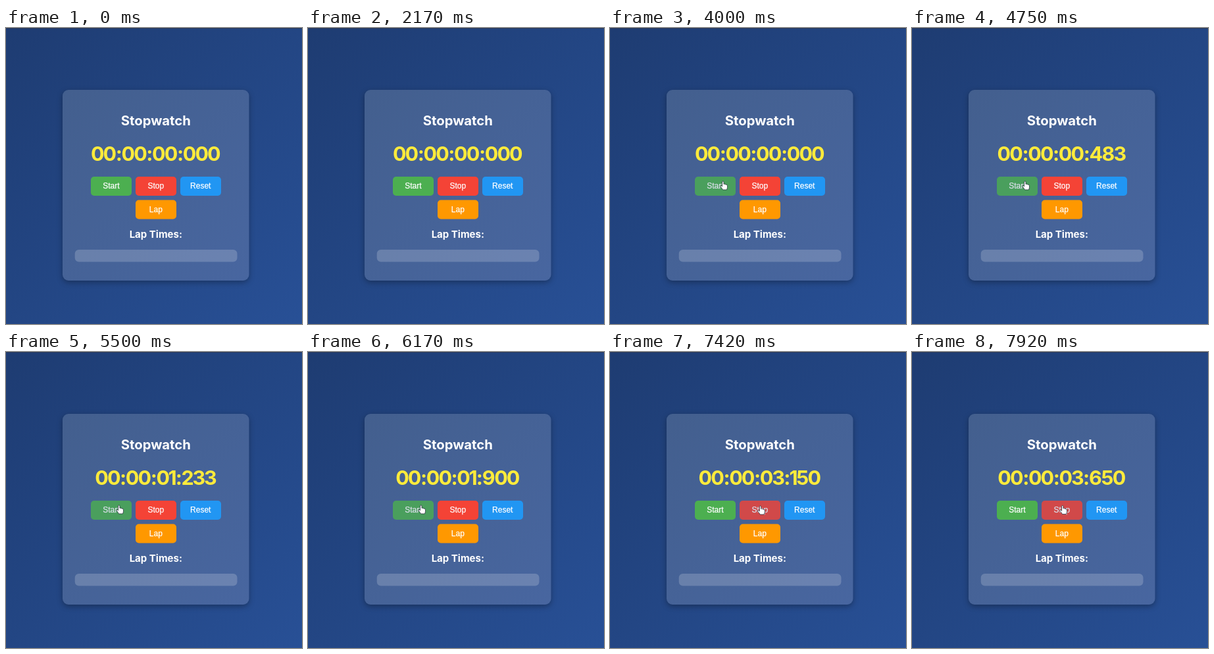
An HTML page that plays this animation: 450x450 px, repeating every 8000 ms.

```html
<!DOCTYPE html>
<html lang="en">
<head>
<meta charset="utf-8">
<title>Stopwatch</title>
<style>
  html, body { margin: 0; width: 100%; height: 100%; overflow: hidden; background: #24477f; }
  svg { display: block; width: 100vw; height: 100vh; }
  text { text-anchor: middle; fill: #fff; }
  .head { font-family: Inter, "Open Sans", sans-serif; font-weight: 700; font-feature-settings: "calt" 0; }
  #time { fill: #ffeb3b; font-weight: 650; }
  .btn text { font: 12px "Liberation Sans", Arial, sans-serif; stroke: #fff; stroke-width: .25; }
  .card { filter: drop-shadow(0 3px 4px rgba(0, 0, 0, .3)); }
  #cursor path { fill: #fff; stroke: #222a38; stroke-width: .7; stroke-linejoin: round; }
</style>
</head>
<body>
<svg viewBox="0 0 450 450">
  <defs>
    <linearGradient id="sky" x1="0" y1="0" x2="1" y2="1">
      <stop offset="0" stop-color="#1e3c72"/>
      <stop offset="1" stop-color="#285096"/>
    </linearGradient>
    <linearGradient id="glass" gradientUnits="userSpaceOnUse" x1="86" y1="94" x2="369" y2="384">
      <stop offset="0" stop-color="#435f8e"/>
      <stop offset="1" stop-color="#4866a0"/>
    </linearGradient>
  </defs>
  <rect width="450" height="450" fill="url(#sky)"/>
  <rect width="450" height="1" fill="#2b3856"/>
  <rect class="card" x="86" y="94" width="283.5" height="290" rx="9" fill="url(#glass)"/>
  <text class="head" x="227.8" y="148" font-size="20.3">Stopwatch</text>
  <text class="head" id="time" y="202.4" font-size="30.5"></text>
  <g id="buttons"></g>
  <text class="head" x="227.8" y="319" font-size="15">Lap Times:</text>
  <rect x="104.7" y="337" width="246.8" height="18.6" rx="6" fill="#fff" fill-opacity=".19"/>
  <g id="cursor">
    <path id="arrow" d="M0 0V9.5L2.2 7.4L3.7 10.8L5.2 10.1L3.8 6.9H6.8Z"/>
    <path id="hand" transform="scale(1.08)" d="M-1.3 7V1Q-1.3 0 -.2 0T.9 1V4Q2.2 3.4 2.8 4.4Q4.1 4 4.6 5Q6 4.7 6 6.2V8.5Q6 10 5 12H-.5Q-1.5 10 -3.8 7.4Q-4.2 6.3 -3.2 6.2Q-2.3 6.2 -1.3 7.4Z"/>
  </g>
</svg>
<script>
const LOOP = 8000, FPS = 12, FADE = 300, CENTER = 227.8, STARTED = 4267;
const $ = id => document.getElementById(id);
const clamp = v => Math.min(1, Math.max(0, v));
const ease = v => v * v * (3 - 2 * v);

function button(label, col, row, fill, from = Infinity, to = Infinity) {
  const x = 129 + 68 * col, y = 226 + 35.5 * row;
  const g = document.createElementNS("http://www.w3.org/2000/svg", "g");
  g.setAttribute("class", "btn");
  g.innerHTML = `<rect x="${x}" y="${y}" width="62" height="29" rx="5" fill="${fill}"/>
    <text x="${x + 30.8}" y="${y + 18.3}">${label}</text>`;
  $("buttons").append(g);
  return { g, from, to };
}

// The last two values are when the pointer enters and leaves
const buttons = [
  button("Start", 0, 0, "#4caf50", 3560, 6800),
  button("Stop", 1, 0, "#f44336", 6870),
  button("Reset", 2, 0, "#2196f3"),
  button("Lap", 1, 1, "#ff9800", 3310, 3460)
];

// Pointer moves along quadratic curves, resting in between
const moves = [
  { from: 2800, to: 3800, a: [424, 347], bend: [230, 285], b: [172, 233] },
  { from: 6650, to: 6833, a: [172, 233], bend: [184, 231], b: [195.3, 230.5] },
  { from: 6833, to: 7450, a: [195.3, 230.5], bend: [212, 268], b: [229, 233.5] }
];

function pointer(t) {
  const { from, to, a, bend, b } = moves.findLast(m => t >= m.from) || moves[0];
  const u = ease(clamp((t - from) / (to - from))), v = 1 - u;
  return a.map((p, i) => v * v * p + 2 * u * v * bend[i] + u * u * b[i]);
}

function format(ms) {
  const pad = (n, len = 2) => String(Math.floor(n)).padStart(len, "0");
  return [pad(ms / 3600000), pad(ms / 60000 % 60), pad(ms / 1000 % 60), pad(ms % 1000, 3)].join(":");
}

// Round digits are wide, open ones a little narrower
const advance = c => c === ":" ? 9.2 : c === "1" ? 10.2 : "2357".includes(c) ? 17.3 : 18.7;

function showTime(label) {
  const widths = [...label].map(advance);
  let x = CENTER - widths.reduce((sum, w) => sum + w) / 2;
  const xs = widths.map(w => (x += w) - w / 2);
  $("time").setAttribute("x", xs.map(v => v.toFixed(2)).join(" "));
  $("time").textContent = label;
}

function draw(t) {
  showTime(format(Math.round(Math.max(0, t - STARTED))));

  let over = false;
  for (const { g, from, to } of buttons) {
    const level = ease(clamp((Math.min(t, to) - from) / FADE)) * (1 - ease(clamp((t - to) / FADE)));
    g.setAttribute("opacity", 1 - .2 * level);
    over = over || (t >= from && t < to);
  }

  $("cursor").setAttribute("visibility", t < moves[0].from ? "hidden" : "visible");
  $("cursor").setAttribute("transform", `translate(${pointer(t)})`);
  $("hand").setAttribute("display", over ? "inline" : "none");
  $("arrow").setAttribute("display", over ? "none" : "inline");
}

const begin = performance.now();
let last = -1;
function tick() {
  const t = (performance.now() - begin) % LOOP;
  const step = Math.min(LOOP * FPS / 1000 - 1, Math.floor((t + 4) * FPS / 1000));
  if (step !== last) draw((last = step) * 1000 / FPS);
  requestAnimationFrame(tick);
}
tick();
</script>
</body>
</html>
```
